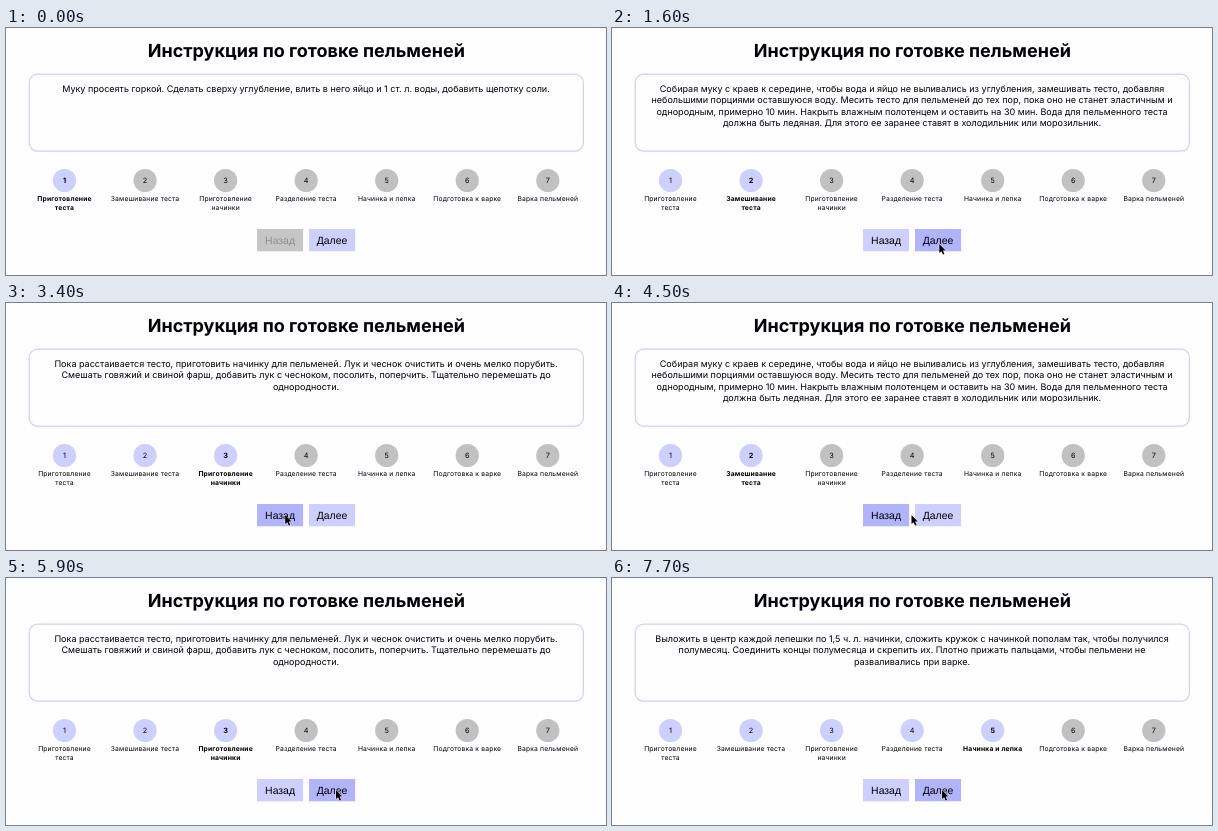
An HTML page for the animation above (8 s loop, 600x247 px).

```html
<!DOCTYPE html>
<html lang="ru">
<head>
<meta charset="utf-8">
<title>Инструкция</title>
<style>
  html, body { margin: 0; width: 100%; height: 100%; overflow: hidden; background: #fefdff; }
  svg { display: block; width: 600px; height: 247px; }
  text { font-family: Inter, Roboto, sans-serif; text-anchor: middle; text-rendering: geometricPrecision; }
  .title { font-size: 18.03px; font-weight: 700; }
  .body { font-size: 9.03px; }
  .num { font-size: 7.3px; }
  .label { font-size: 6.75px; letter-spacing: .16px; }
  .button { font: 10.45px "Liberation Sans", Arial, sans-serif; }
</style>
</head>
<body>
<svg id="stage" viewBox="0 0 600 247"></svg>
<script>
const LOOP = 8000, FRAME = 100;
const ACTIVE = '#cdcfff', HOVER = '#b1b3fb', IDLE = '#c1c1c1';
const BUTTON = { y: 201, width: 46.1, height: 22.3 };

const steps = [
  { label: ['Приготовление', 'теста'], body: [
    'Муку просеять горкой. Сделать сверху углубление, влить в него яйцо и 1 ст. л. воды, добавить щепотку соли.'] },
  { label: ['Замешивание теста'], boldLabel: ['Замешивание', 'теста'], body: [
    'Собирая муку с краев к середине, чтобы вода и яйцо не выливались из углубления, замешивать тесто, добавляя',
    'небольшими порциями оставшуюся воду. Месить тесто для пельменей до тех пор, пока оно не станет эластичным и',
    'однородным, примерно 10 мин. Накрыть влажным полотенцем и оставить на 30 мин. Вода для пельменного теста',
    'должна быть ледяная. Для этого ее заранее ставят в холодильник или морозильник.'] },
  { label: ['Приготовление', 'начинки'], body: [
    'Пока расстаивается тесто, приготовить начинку для пельменей. Лук и чеснок очистить и очень мелко порубить.',
    'Смешать говяжий и свиной фарш, добавить лук с чесноком, посолить, поперчить. Тщательно перемешать до',
    'однородности.'] },
  { label: ['Разделение теста'], body: [
    'Готовое тесто разделить на несколько частей, из каждой скатать колбаску толщиной 2-3 см. Нарезать кусочками,',
    'обвалять в муке и раскатать в тонкие лепешки.'] },
  { label: ['Начинка и лепка'], body: [
    'Выложить в центр каждой лепешки по 1,5 ч. л. начинки, сложить кружок с начинкой пополам так, чтобы получился',
    'полумесяц. Соединить концы полумесяца и скрепить их. Плотно прижать пальцами, чтобы пельмени не',
    'разваливались при варке.'] },
  { label: ['Подготовка к варке'], body: [] },
  { label: ['Варка пельменей'], body: [] }
];

// [time, step index]
const clicks = [[0, 0], [1100, 1], [2400, 2], [3600, 1], [5200, 2], [6400, 3], [7300, 4]];

// [time, x, y] of the pointer tip
const path = [
  [0, 346, 262], [200, 346, 262], [300, 345, 243], [500, 340, 231], [700, 332, 219], [900, 327.3, 216],
  [2500, 327.3, 216], [2700, 322, 216.5], [3000, 303, 216], [3200, 288, 213], [3400, 279.2, 212],
  [4000, 279.2, 212], [4200, 283, 212.5], [4500, 299.5, 212], [4800, 325, 212], [4900, 330, 212],
  [LOOP, 330, 212]
];

const stage = document.getElementById('stage');

function add(tag, attrs, parent = stage) {
  const node = document.createElementNS('http://www.w3.org/2000/svg', tag);
  for (const key in attrs) node.setAttribute(key, attrs[key]);
  return parent.appendChild(node);
}

function addText(cls, x, y, value, parent) {
  const node = add('text', { class: cls, x, y }, parent);
  node.textContent = value;
  return node;
}

function addLines(cls, x, y, gap, lines, parent) {
  lines.forEach((line, i) => addText(cls, x, y + i * gap, line, parent));
}

function addButton(x, caption) {
  const rect = add('rect', { x, ...BUTTON });
  return { x, rect, text: addText('button', x + BUTTON.width / 2, 215.8, caption) };
}

function paintButton(button, tip, disabled) {
  const pad = 2.6;
  const over = tip.x > button.x - pad && tip.x < button.x + BUTTON.width + pad
    && tip.y > BUTTON.y && tip.y < BUTTON.y + BUTTON.height;
  button.rect.setAttribute('fill', disabled ? '#c6c6c6' : over ? HOVER : ACTIVE);
  button.text.setAttribute('fill', disabled ? '#8e8e8e' : '#000');
}

addText('title', 300.3, 29, 'Инструкция по готовке пельменей');
add('rect', { x: 23.2, y: 46.2, width: 554.2, height: 77, rx: 8.5, fill: 'none', stroke: ACTIVE, 'stroke-width': 1.2 });
const body = add('g', {});
const marks = steps.map((step, i) => {
  const x = 58.5 + i * 80.55;
  return {
    x,
    circle: add('circle', { cx: x, cy: 152.5, r: 11.6 }),
    num: addText('num', x, 155.2, i + 1),
    label: add('g', {})
  };
});
const back = addButton(251, 'Назад');
const next = addButton(303, 'Далее');
const pointer = add('path', {
  d: 'M0 0V9.1L2.1 7.2L3.6 10.6L5.1 9.9L3.6 6.6H6.3Z',
  stroke: '#fff', 'stroke-width': .8, 'paint-order': 'stroke'
});

let shown = -1;

function showStep(index) {
  if (index === shown) return;
  shown = index;
  body.replaceChildren();
  addLines('body', 300, 64.3, 11.15, steps[index].body, body);
  marks.forEach((mark, i) => {
    const current = i === index, weight = current ? 700 : 400;
    mark.circle.setAttribute('fill', i <= index ? ACTIVE : IDLE);
    mark.num.setAttribute('font-weight', weight);
    mark.label.setAttribute('font-weight', weight);
    mark.label.replaceChildren();
    const lines = current && steps[i].boldLabel || steps[i].label;
    addLines('label', mark.x, 173.3, 8.4, lines, mark.label);
  });
}

function tipAt(t) {
  const i = path.findIndex(point => point[0] > t);
  const [t0, x0, y0] = path[i - 1], [t1, x1, y1] = path[i];
  const k = (t - t0) / (t1 - t0);
  return { x: x0 + (x1 - x0) * k, y: y0 + (y1 - y0) * k };
}

function render(time) {
  const t = Math.floor(time % LOOP / FRAME) * FRAME;
  const index = clicks.filter(click => click[0] <= t).pop()[1];
  const tip = tipAt(t);
  showStep(index);
  paintButton(back, tip, index === 0);
  paintButton(next, tip, false);
  pointer.setAttribute('transform', `translate(${tip.x} ${tip.y})`);
}

const start = performance.now();
function tick() {
  render(performance.now() - start);
  requestAnimationFrame(tick);
}
tick();
</script>
</body>
</html>
```
